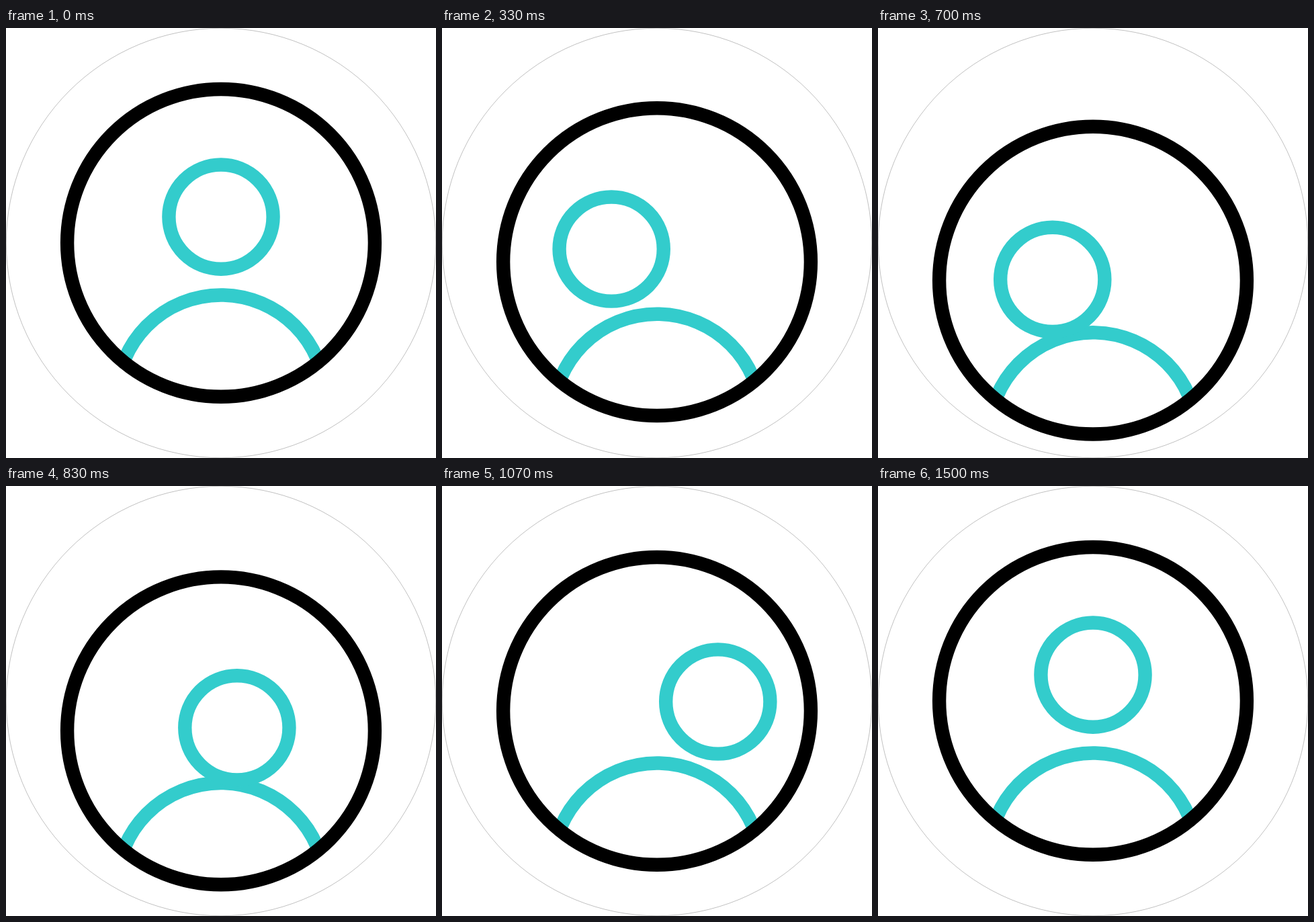
These frames come from a looping animation (640x640 px, 2000 ms). An HTML page with a canvas:

```html
<!DOCTYPE html>
<html lang="en">
<head>
<meta charset="utf-8">
<title>Avatar</title>
<style>
  html, body { margin: 0; width: 100%; height: 100%; overflow: hidden; background: #fff; }
  canvas { display: block; width: 640px; height: 640px; }
</style>
</head>
<body>
<canvas id="stage" width="640" height="640"></canvas>
<script>
const SIZE = 640, LOOP = 2000, LAST = 45, TEAL = '#33cccc';
const ctx = document.getElementById('stage').getContext('2d');

const bezier = (a, b, c, d, s) => {
  const r = 1 - s;
  return a * r * r * r + 3 * b * r * r * s + 3 * c * r * s * s + d * s * s * s;
};
const smooth = x => x * x * (3 - 2 * x);
const span = (t, from, to) => Math.min(1, Math.max(0, (t - from) / (to - from)));

// Ease with horizontal handles at both ends, solved by bisection.
function ease(x, outHandle, inHandle) {
  let lo = 0, hi = 1;
  for (let i = 0; i < 30; i++) {
    const mid = (lo + hi) / 2;
    if (bezier(0, outHandle, inHandle, 1, mid) < x) lo = mid; else hi = mid;
  }
  return smooth((lo + hi) / 2);
}

// A spatial curve that is walked by arc length.
function makePath(p0, p1, p2, p3) {
  const steps = 200;
  const at = s => [0, 1].map(k => bezier(p0[k], p1[k], p2[k], p3[k], s));
  const lengths = [0];
  let prev = at(0);
  for (let i = 1; i <= steps; i++) {
    const next = at(i / steps);
    lengths.push(lengths[i - 1] + Math.hypot(next[0] - prev[0], next[1] - prev[1]));
    prev = next;
  }
  return p => {
    const goal = p * lengths[steps];
    let i = 1;
    while (i < steps && lengths[i] < goal) i++;
    const part = (goal - lengths[i - 1]) / (lengths[i] - lengths[i - 1]);
    return at((i - 1 + part) / steps);
  };
}

// Each handle at a turning point is a sixth of the way between its neighbours.
const shift = (p, q, k) => [p[0] + q[0] * k, p[1] + q[1] * k];
const home = [0, 0], left = [-102.5, 36], right = [89.6, 27.7];
const headMoves = [
  { from: 0, to: 17, path: makePath(home, home, shift(left, right, -1 / 6), left) },
  { from: 17, to: 30.2, path: makePath(left, shift(left, right, 1 / 6), shift(right, left, 1 / 6), right) },
  { from: 30.2, to: LAST, path: makePath(right, shift(right, left, -1 / 6), home, home) }
];

function headOffset(f) {
  const move = headMoves.find(m => f <= m.to);
  return move.path(smooth(span(f, move.from, move.to)));
}

function drop(f) {
  const depth = 56.5;
  return f < 20 ? depth * smooth(span(f, 0, 20))
                : depth * (1 - ease(span(f, 20, 38), 0.27, 0.71));
}

function arc(x, y, r, color, width, from = 0, to = 2 * Math.PI) {
  ctx.strokeStyle = color;
  ctx.lineWidth = width;
  ctx.beginPath();
  ctx.arc(x, y, r, from, to);
  ctx.stroke();
}

function draw(f) {
  const [hx, hy] = headOffset(f), weight = 20.4;
  ctx.fillStyle = '#fff';
  ctx.fillRect(0, 0, SIZE, SIZE);
  arc(320, 320, 319.7, '#000', 0.25);
  ctx.save();
  ctx.translate(320, drop(f));
  arc(0, 552.9, 155.4, TEAL, weight, Math.PI + 0.4, 2 * Math.PI - 0.4);
  arc(hx, 281.1 + hy, 77.6, TEAL, weight);
  arc(0, 319.85, 228.9, '#000', weight);
  ctx.restore();
}

// The motion advances in thirtieths of a second.
function tick() {
  const t = performance.now() % LOOP;
  draw(Math.min(LAST, Math.floor((t + 3.4) * 0.03)));
  requestAnimationFrame(tick);
}
tick();
</script>
</body>
</html>
```
